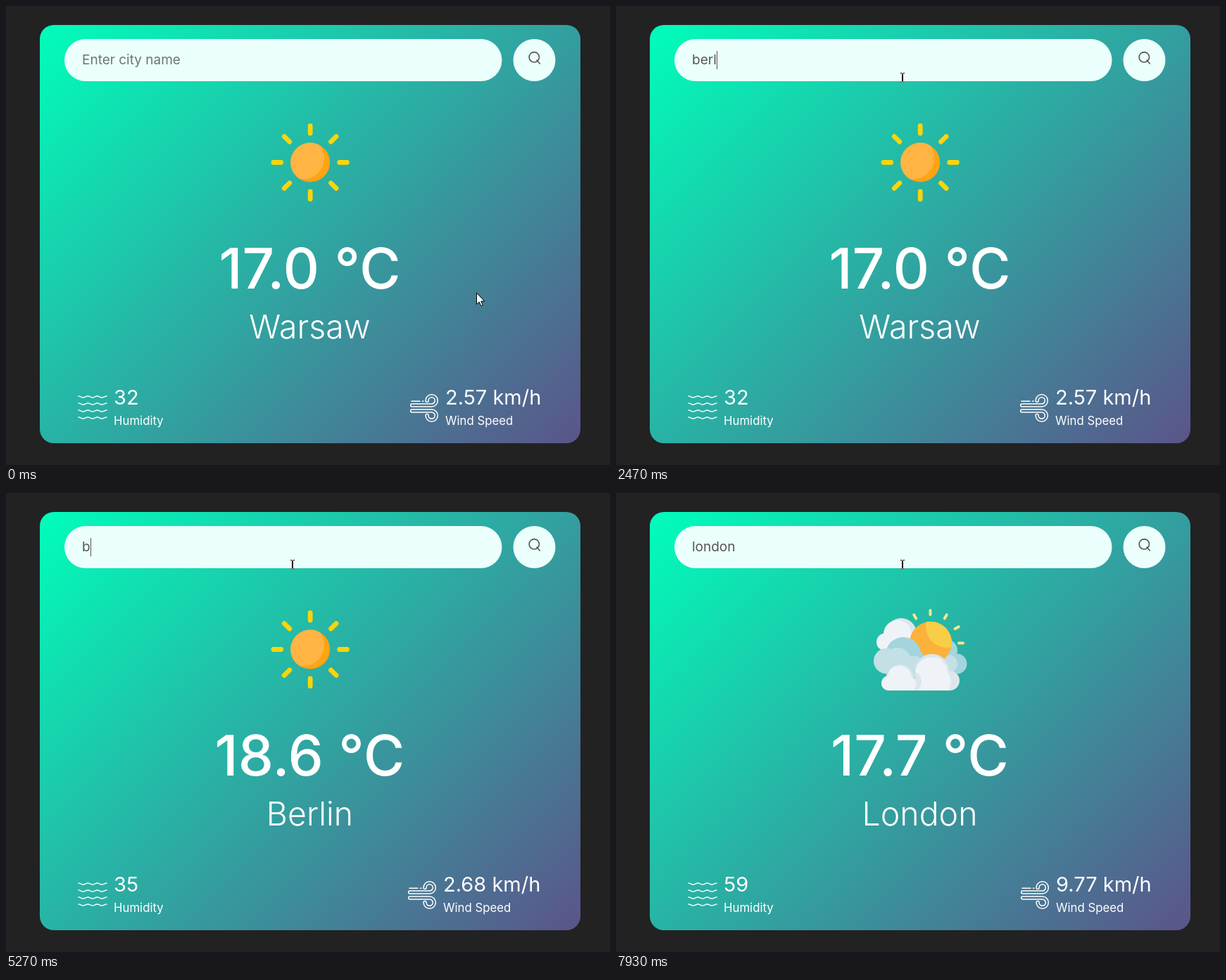
Recreate the animation shown at these times as an HTML page with a canvas. Size 858 px wide and 653 px high, loop 8000 ms.

```html
<!DOCTYPE html>
<html lang="en">
<head>
<meta charset="utf-8">
<title>Weather card</title>
<style>
  html, body { margin: 0; width: 100%; height: 100%; overflow: hidden; background: #222; }
  canvas { display: block; }
</style>
</head>
<body>
<canvas id="stage" width="858" height="653"></canvas>
<script>
const ctx = document.getElementById('stage').getContext('2d');
const LOOP = 8000;
const FONT = 'Inter, "Open Sans", sans-serif';

// Each entry holds from its start time until the next one.
const reports = [
  { at: 0, temp: '17.0', city: 'Warsaw', humidity: '32', wind: '2.57', windX: 624, icon: drawSun },
  { at: 3670, temp: '18.6', city: 'Berlin', humidity: '35', wind: '2.68', windX: 621, icon: drawSun },
  { at: 7800, temp: '17.7', city: 'London', humidity: '59', wind: '9.77', windX: 625, icon: drawCloudySun }
];
const entries = [
  [0, ''], [2000, 'b'], [2130, 'be'], [2200, 'ber'], [2470, 'berl'], [2730, 'berli'], [2930, 'berlin'],
  [4600, 'berli'], [4800, 'berl'], [4870, 'ber'], [5070, 'be'], [5270, 'b'], [5330, ''],
  [6000, 'l'], [6130, 'lo'], [6730, 'lon'], [7130, 'lond'], [7270, 'londo'], [7400, 'london']
].map(([at, text]) => ({ at, text }));
const caretSpans = [[1000, 1530], [2000, 3470], [4000, 4530], [5070, 5600], [6000, 7930]];

const current = (list, t) => list.filter(item => item.at <= t).pop();

function text(str, x, y, size, color = '#fff', weight = 400, align = 'left') {
  ctx.font = `${weight} ${size}px ${FONT}`;
  ctx.fillStyle = color;
  ctx.textAlign = align;
  ctx.fillText(str, x, y);
}

function pill(x, y, w, h, r, fill) {
  ctx.fillStyle = fill;
  ctx.beginPath();
  ctx.roundRect(x, y, w, h, r);
  ctx.fill();
}

function discs(fill, ...list) {
  ctx.fillStyle = fill;
  for (const [x, y, r] of list) {
    ctx.beginPath();
    ctx.arc(x, y, r, 0, Math.PI * 2);
    ctx.fill();
  }
}

function clipped(shape, draw) {
  ctx.save();
  ctx.beginPath();
  shape();
  ctx.clip();
  draw();
  ctx.restore();
}

function rays(cx, cy, from, to, width, color, angles) {
  ctx.strokeStyle = color;
  ctx.lineWidth = width;
  ctx.lineCap = 'round';
  ctx.beginPath();
  for (const deg of angles) {
    const a = deg * Math.PI / 180, c = Math.cos(a), s = Math.sin(a);
    ctx.moveTo(cx + c * from, cy + s * from);
    ctx.lineTo(cx + c * to, cy + s * to);
  }
  ctx.stroke();
}

function drawSun() {
  const x = 432.2, y = 222.5;
  rays(x, y, 41.5, 52.2, 6.8, '#f9d50b', [0, 45, 90, 135, 180, 225, 270, 315]);
  discs('#ffa412', [x, y, 28]);
  clipped(() => ctx.arc(x, y, 28, 0, Math.PI * 2), () => discs('#ffb444', [422, 216.5, 30]));
}

function drawCloudySun() {
  const white = '#eff3f7', shade = '#dce7eb', blue = '#a4d4dd', paleBlue = '#c2e0e6';
  rays(446.5, 213.5, 40.5, 46.5, 4, '#f6e68d', [-120, -90, -60, -30, 0]);

  discs(shade, [405, 200, 22]);
  discs(white, [400, 201, 20], [382.5, 212, 12.5]);

  discs(blue, [469, 224, 16], [484, 243, 14.5]);
  discs(paleBlue, [472, 243, 13]);

  discs('#fcb13b', [447, 213, 30]);
  clipped(() => ctx.arc(447, 213, 30, 0, Math.PI * 2), () => discs('#f8ce49', [470, 190, 30]));

  discs(blue, [408, 230, 25], [422, 240, 18]);
  discs(paleBlue, [384, 239, 18], [400, 239, 19]);
  pill(384, 232, 50, 40, 8, paleBlue);

  const frontCloud = () => {
    for (const [x, y, r] of [[387.5, 270.5, 10.5], [404, 262, 18], [449, 253, 24], [474, 267, 14]]) {
      ctx.moveTo(x + r, y);
      ctx.arc(x, y, r, 0, Math.PI * 2);
    }
    ctx.rect(388, 264, 86, 17);
  };
  clipped(frontCloud, () => {
    ctx.fillStyle = shade;
    ctx.fillRect(370, 225, 125, 56);
    discs(white, [448, 257, 23], [462, 269, 14]);
    ctx.fillStyle = white;
    ctx.fillRect(426, 258, 48, 23);
    discs(shade, [418, 268, 16]);
    discs(white, [386, 271, 12], [402, 264, 18], [412, 273, 14]);
  });
  ctx.strokeStyle = white;
  ctx.lineWidth = 2.5;
  ctx.beginPath();
  ctx.arc(450, 253, 19, -1.35, -0.8);
  ctx.moveTo(467, 244.5);
  ctx.arc(450, 253, 19, -0.46, -0.25);
  ctx.stroke();
}

function drawWaves() {
  ctx.strokeStyle = '#fff';
  ctx.lineWidth = 1.4;
  ctx.beginPath();
  for (let y = 556; y <= 586; y += 10) {
    for (let x = 0; x <= 40; x++) {
      const waveY = y - Math.cos(x * Math.PI * 2 / 13.3);
      x ? ctx.lineTo(103 + x, waveY) : ctx.moveTo(103, waveY);
    }
  }
  ctx.stroke();
}

const gust = new Path2D('M2.7 18H30.7A8.6 8.6 0 1 0 22.1 9.4A2 2 0 0 0 26.1 9.4A4.6 4.6 0 1 1 30.7 14H2.7A2 2 0 0 0 2.7 18Z');
const gustTail = new Path2D('M2 10.3H14M17.5 10.3H19');

function drawWind(x) {
  ctx.save();
  ctx.translate(x, 552);
  ctx.strokeStyle = '#fff';
  ctx.lineWidth = 1.5;
  ctx.stroke(gust);
  ctx.stroke(gustTail);
  ctx.translate(0, 40);
  ctx.scale(1, -1);
  ctx.stroke(gust);
  ctx.restore();
}

function drawCard() {
  ctx.fillStyle = '#222';
  ctx.fillRect(0, 0, 858, 653);
  const reach = (768 + 595) / 4;
  const fill = ctx.createLinearGradient(432 - reach, 324.5 - reach, 432 + reach, 324.5 + reach);
  fill.addColorStop(0, '#00feba');
  fill.addColorStop(1, '#5b548a');
  pill(48, 27, 768, 595, 20, fill);
  pill(83, 47, 621.5, 60, 30, '#ebfffc');
  discs('#ebfffc', [750.5, 77, 30]);

  ctx.strokeStyle = '#555';
  ctx.lineWidth = 1.6;
  ctx.lineCap = 'round';
  ctx.beginPath();
  ctx.arc(750.3, 72.8, 7.2, 0, Math.PI * 2);
  ctx.moveTo(754, 77);
  ctx.lineTo(758.3, 82);
  ctx.stroke();
}

function drawField(t) {
  const typed = current(entries, t).text;
  text(typed || 'Enter city name', 108, 83, 19, typed ? '#555' : '#6e7574');
  if (caretSpans.some(([on, off]) => t >= on && t < off)) {
    const x = Math.round(108 + ctx.measureText(typed).width);
    ctx.fillStyle = '#555';
    ctx.fillRect(x, 64, 1, 26);
  }
}

function drawReport({ temp, city, humidity, wind, windX, icon }) {
  icon();
  text(`${temp} °C`, 431.5, 402, 80, '#fff', 550, 'center');
  text(city, 431.5, 473, 46.5, '#fff', 320, 'center');
  drawWaves();
  text(humidity, 153, 567, 29);
  text('Humidity', 153, 596, 16.8);
  drawWind(windX - 50);
  text(`${wind} km/h`, windX, 567, 29);
  text('Wind Speed', windX, 596, 16.8);
}

const arrow = new Path2D('M.5 .5V16.5L4.2 13L6.8 18.6L9.3 17.5L6.8 12H11.5Z');

function drawPointer(t) {
  const step = Math.min(11, Math.floor((t + 4) * 0.015));
  const p = 1 - (1 - step / 11) ** 2.1;
  const x = Math.round(668 - 261 * p);
  const y = Math.round(408 - 306 * p - 48 * p * (1 - p));
  ctx.save();
  ctx.translate(x, y);
  ctx.fillStyle = '#fff';
  if (y < 107) {
    // The text pointer inverts whatever lies under it.
    ctx.globalCompositeOperation = 'difference';
    ctx.fillRect(-3, -7, 2, 1);
    ctx.fillRect(1, -7, 2, 1);
    ctx.fillRect(-1, -6, 2, 12);
    ctx.fillRect(-3, 6, 2, 1);
    ctx.fillRect(1, 6, 2, 1);
  } else {
    ctx.strokeStyle = '#000';
    ctx.lineWidth = 1;
    ctx.fill(arrow);
    ctx.stroke(arrow);
  }
  ctx.restore();
}

const start = performance.now();

function frame() {
  const t = (performance.now() - start) % LOOP;
  drawCard();
  drawField(t);
  drawReport(current(reports, t));
  drawPointer(t);
  requestAnimationFrame(frame);
}
frame();
</script>
</body>
</html>
```
